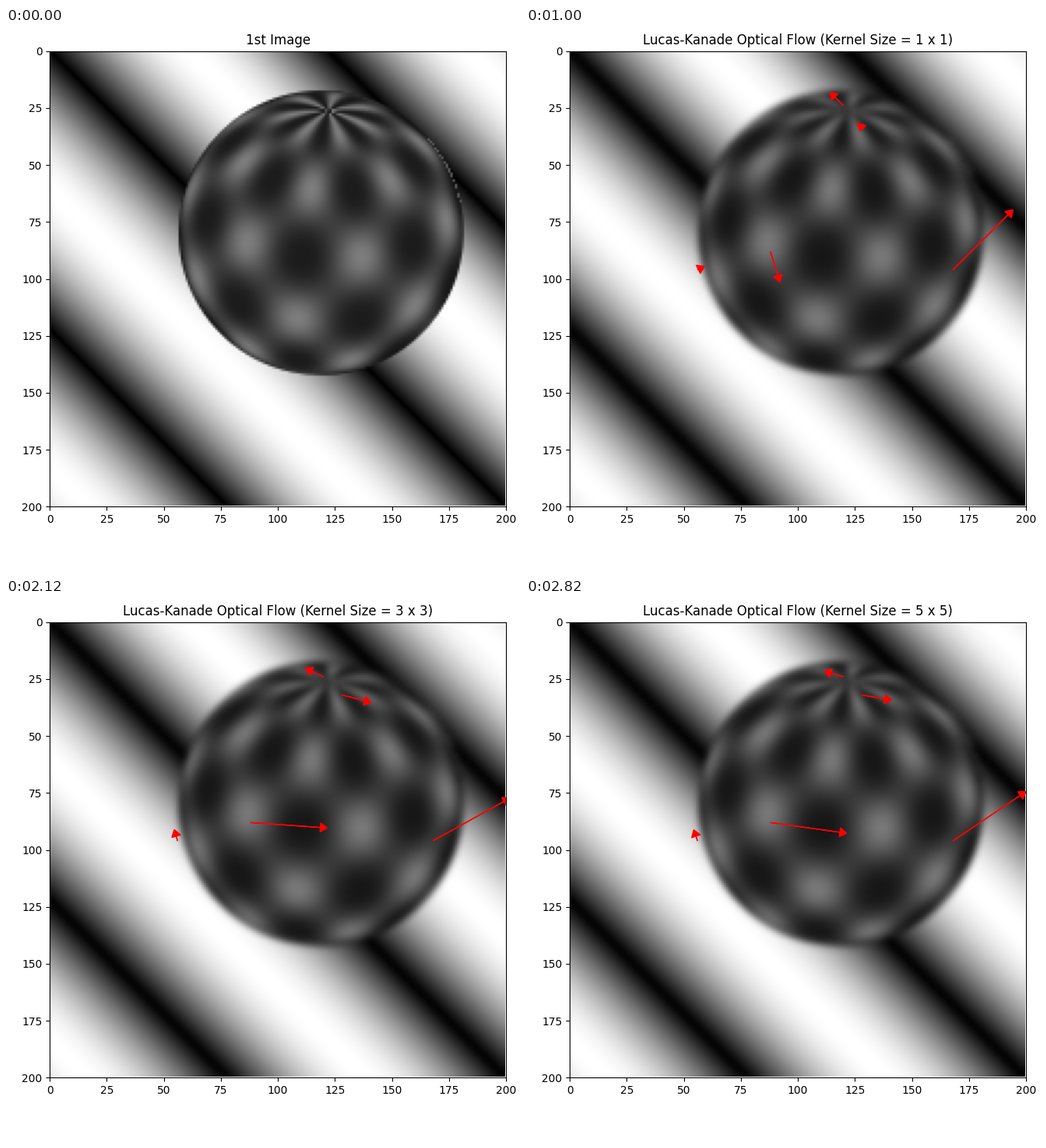
Write a matplotlib script that moves like this. It is 660x698 px and loops after 3.1 s.

```python
import numpy as np
import matplotlib.pyplot as plt
from matplotlib.animation import FuncAnimation

W, H, DPI = 660, 698, 100
SIZE = 200
CENTER = (118.9, 79.9)
RADIUS = 62.4
POLE = np.array([0.051, 0.856, 0.514])
STEP_MS = 100

plt.rcParams["font.family"] = "DejaVu Sans"


def sphere_texture(x, y, z, spin):
    """Waves in latitude and longitude around the tilted pole."""
    pole = POLE / np.linalg.norm(POLE)
    east = np.array([1, 0, 0]) - pole[0] * pole
    east /= np.linalg.norm(east)
    front = np.cross(east, pole)
    p = np.stack([x, y, z], axis=-1)
    colat = np.arccos(np.clip(p @ pole, -1, 1))
    lon = np.arctan2(p @ east, p @ front)
    # the innermost row keeps its strength up to the pole
    rows = np.sin(np.maximum(6.5 * colat, 1.2))
    wave = rows * np.cos(7 * (lon - np.radians(16.4 + spin)))
    return (28 + 97 * ((wave + 1) / 2) ** 1.5) / 255


def render(spin):
    col, row = np.meshgrid(np.arange(SIZE), np.arange(SIZE))
    stripes = np.abs(np.sin(np.pi * (col - row) / 122))
    x = (col - CENTER[0]) / RADIUS
    y = (CENTER[1] - row) / RADIUS
    r = np.hypot(x, y)
    z = np.sqrt(np.clip(1 - r**2, 0, 1))
    ball = sphere_texture(x, y, z, spin) * (1 - 0.65 * (1 - z) ** 6)
    cover = np.clip((1 - r) * RADIUS + 0.5, 0, 1)
    image = stripes * (1 - cover) + ball * cover
    # faint glint along the upper right rim
    angle = np.degrees(np.arctan2(y, x))
    rim = np.abs((r - 1) * RADIUS) < 0.3
    image[rim & (angle > 12) & (angle < 42)] = 0.36
    return image


def blur(image, sigma=1.5):
    n = 6
    kernel = np.exp(-0.5 * (np.arange(-n, n + 1) / sigma) ** 2)
    kernel /= kernel.sum()
    out = np.pad(image, n, mode="symmetric")
    for axis in (0, 1):
        out = np.apply_along_axis(np.convolve, axis, out, kernel, "valid")
    return (out - out.min()) / (out.max() - out.min())


def flow(speed, heading, turn, normal, kernel):
    """Flow seen through a window of the given size.

    A single pixel only sees the part along the local gradient.
    """
    if kernel == 1:
        speed *= np.cos(np.radians(heading - normal))
        heading = normal
    else:
        heading += turn * (kernel - 3) / 2
    a = np.radians(heading)
    return speed * np.cos(a), speed * np.sin(a)


first, second = render(0), render(2.5)
smooth = blur(first)

fig = plt.figure(figsize=(W / DPI, H / DPI), dpi=DPI, facecolor="white")
side = 585.7
ax = fig.add_axes([56.25 / W, 82.65 / H, side / W, side / H])
picture = ax.imshow(first, cmap="gray", vmin=0, vmax=1, aspect="auto")
ax.set_xlim(0, SIZE)
ax.set_ylim(SIZE, 0)
ax.set_xticks(range(0, SIZE + 1, 25))
ax.set_yticks(range(0, SIZE + 1, 25))
title = ax.set_title("", fontsize=12)

# corner position, speed, heading, turn, gradient direction (degrees)
CORNERS = [
    (120, 24, 5.7, 205, -9, 225),
    (128, 32, 10.3, 14, -4, 103),
    (88, 88, 30.7, 4, 4, 73),
    (56, 96, 2.1, -106, -3, -27),
    (168, 96, 35.6, -29, -5, -45),
]
arrows = {
    k: [
        ax.arrow(x, y, *flow(*motion, k), head_width=4, head_length=3, color="red")
        for x, y, *motion in CORNERS
    ]
    for k in (1, 3, 5)
}

# end time, image, title, kernel size
STAGES = [(500, first, "1st Image", None), (1000, second, "2nd Image", None)]
STAGES += [
    (1700 + 350 * (k - 1), smooth,
     f"Lucas-Kanade Optical Flow (Kernel Size = {k} x {k})", k)
    for k in arrows
]


def update(frame):
    now = frame * STEP_MS
    _, image, text, kernel = next(s for s in STAGES if now < s[0])
    picture.set_data(image)
    title.set_text(text)
    for k, group in arrows.items():
        for arrow in group:
            arrow.set_visible(k == kernel)
    return [picture, title]


anim = FuncAnimation(fig, update, frames=STAGES[-1][0] // STEP_MS,
                     interval=STEP_MS, repeat=True, repeat_delay=0)
plt.show()
```
